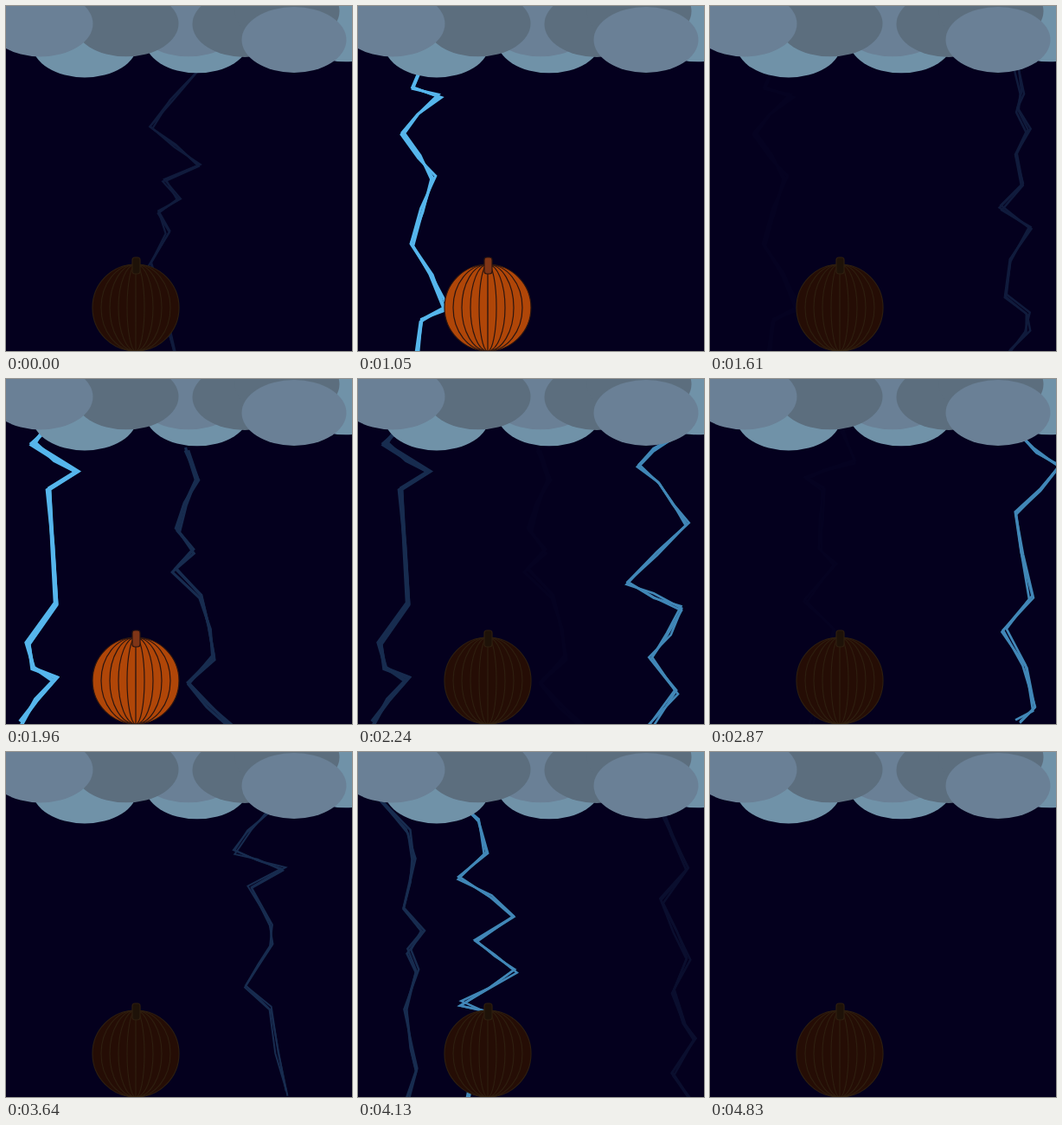
An HTML page for the animation above (4.97 s loop, 400 px wide and 398 px high).

```html
<!DOCTYPE html>
<html lang="en">
<head>
<meta charset="utf-8">
<title>Thunderstorm over a pumpkin</title>
<style>
  html, body { margin: 0; width: 100%; height: 100%; overflow: hidden; background: #04001e; }
  svg { display: block; width: 100%; height: 100%; }
  #bolts { fill: none; stroke: #56b6ec; }
  #pumpkin { fill: #250d05; stroke: #2e1e0f; stroke-width: 1.2; }
  #pumpkin .stem { fill: #1e1208; }
  #pumpkin.lit { fill: #b04608; stroke: #2b1510; }
  #pumpkin.lit .stem { fill: #7f3517; }
  .pale { fill: #7092a8; }
  .slate { fill: #6a8096; }
  .dark { fill: #5c6e7e; }
</style>
</head>
<body>
<svg viewBox="0 0 400 398" preserveAspectRatio="none">
  <g id="bolts"></g>
  <g id="pumpkin"></g>
  <g id="clouds"></g>
</svg>
<script>
const LOOP = 4970, STEP = 70, FADE_STEPS = 10;
const bolts = [];
const boltLayer = document.getElementById('bolts');
const pumpkin = document.getElementById('pumpkin');
const clouds = document.getElementById('clouds');

function add(parent, tag, attrs) {
  const el = document.createElementNS('http://www.w3.org/2000/svg', tag);
  for (const key in attrs) el.setAttribute(key, attrs[key]);
  return parent.appendChild(el);
}

function seeded(seed) {
  return () => (seed = (seed * 16807) % 2147483647) / 2147483647;
}

// Breaks long segments at a slightly displaced midpoint.
function roughen(corners, random) {
  return corners.flatMap((corner, i) => {
    if (i === 0) return [corner];
    const [x, y] = corners[i - 1], [x2, y2] = corner;
    if (Math.hypot(x2 - x, y2 - y) < 55) return [corner];
    return [[(x + x2) / 2 + (random() - 0.5) * 7, (y + y2) / 2], corner];
  });
}

// A bolt is three jittered strands along one zigzag of key corners.
function strike(time, width, corners, lights = true) {
  const random = seeded(time + 5000);
  const path = roughen(corners, random);
  const group = add(boltLayer, 'g', { 'stroke-width': width });
  const jitter = v => (v + (random() - 0.5) * 6).toFixed(1);
  for (let strand = 0; strand < 3; strand++) {
    add(group, 'polyline', { points: path.map(p => p.map(jitter).join()).join(' ') });
  }
  bolts.push({ time, lights, group });
}

const parse = text => text.split(' ').map(pair => pair.split(',').map(Number));

function zigzag(seed, center, spread) {
  const random = seeded(seed), corners = [];
  for (let y = 52; y < 420; y += 18 + random() * 28) {
    corners.push([center + (random() * 2 - 1) * spread, y]);
  }
  return corners;
}

strike(-350, 2.2, parse('222,74 168,140 224,182 184,201 200,221 174,237 187,262 165,298 197,402'));
strike(1050, 3, parse('76,65 62,96 95,103 52,148 87,198 62,274 101,349 74,363 68,402'));
strike(1260, 2.5, zigzag(731, 364, 33));
strike(1680, 3.2, parse('209,80 220,114 199,175 216,199 194,221 226,251 241,322 210,351 260,401'));
strike(1960, 4.2, parse('46,60 31,74 82,109 50,128 57,261 26,305 32,333 56,346 18,398'));
strike(2170, 2.6, parse('367,66 323,100 348,121 380,168 313,235 375,265 338,322 368,362 336,403'));
strike(2310, 2.2, parse('150,50 167,95 109,114 130,128 128,197 144,213 111,256 145,290 117,402'));
strike(2800, 2.7, parse('358,64 402,102 355,155 360,201 372,253 340,291 364,331 374,381 356,394'));
strike(3360, 2, parse('305,67 262,116 321,136 281,157 306,200 306,222 275,270 304,296 324,394'), false);
strike(3710, 2.5, zigzag(4127, 370, 27), false);
strike(3850, 2.5, zigzag(2203, 52, 31));
strike(4060, 2.5, zigzag(915, 150, 38));

for (let rx = 50; rx >= 0; rx -= 10) {
  add(pumpkin, 'ellipse', { cx: 150, cy: 348, rx: rx || 0.1, ry: 50 });
}
add(pumpkin, 'rect', { class: 'stem', x: 146, y: 290, width: 9, height: 19, rx: 3 });

function cloud(tone, cx, cy) {
  add(clouds, 'ellipse', { class: tone, cx, cy, rx: 60.5, ry: 38 });
}
cloud('pale', 91, 44.5);
cloud('pale', 221, 39.3);
cloud('pale', 393, 26.3);
cloud('slate', 211, 20.3);
cloud('dark', 139, 20.3);
cloud('dark', 276, 21);
cloud('dark', 325, 6);
cloud('slate', 40, 20.5);
cloud('slate', 333, 39);

function draw(now) {
  const time = Math.floor((now % LOOP) / STEP) * STEP;
  let lit = false;
  for (const { time: start, lights, group } of bolts) {
    const age = (time - start) / STEP;
    const glow = age < 0 ? 0 : Math.max(0, 1 - age / FADE_STEPS) ** 2.8;
    group.setAttribute('opacity', glow);
    if (lights && age === 0) lit = true;
  }
  pumpkin.classList.toggle('lit', lit);
}

const began = performance.now();
function tick() {
  draw(performance.now() - began);
  requestAnimationFrame(tick);
}
tick();
</script>
</body>
</html>
```
